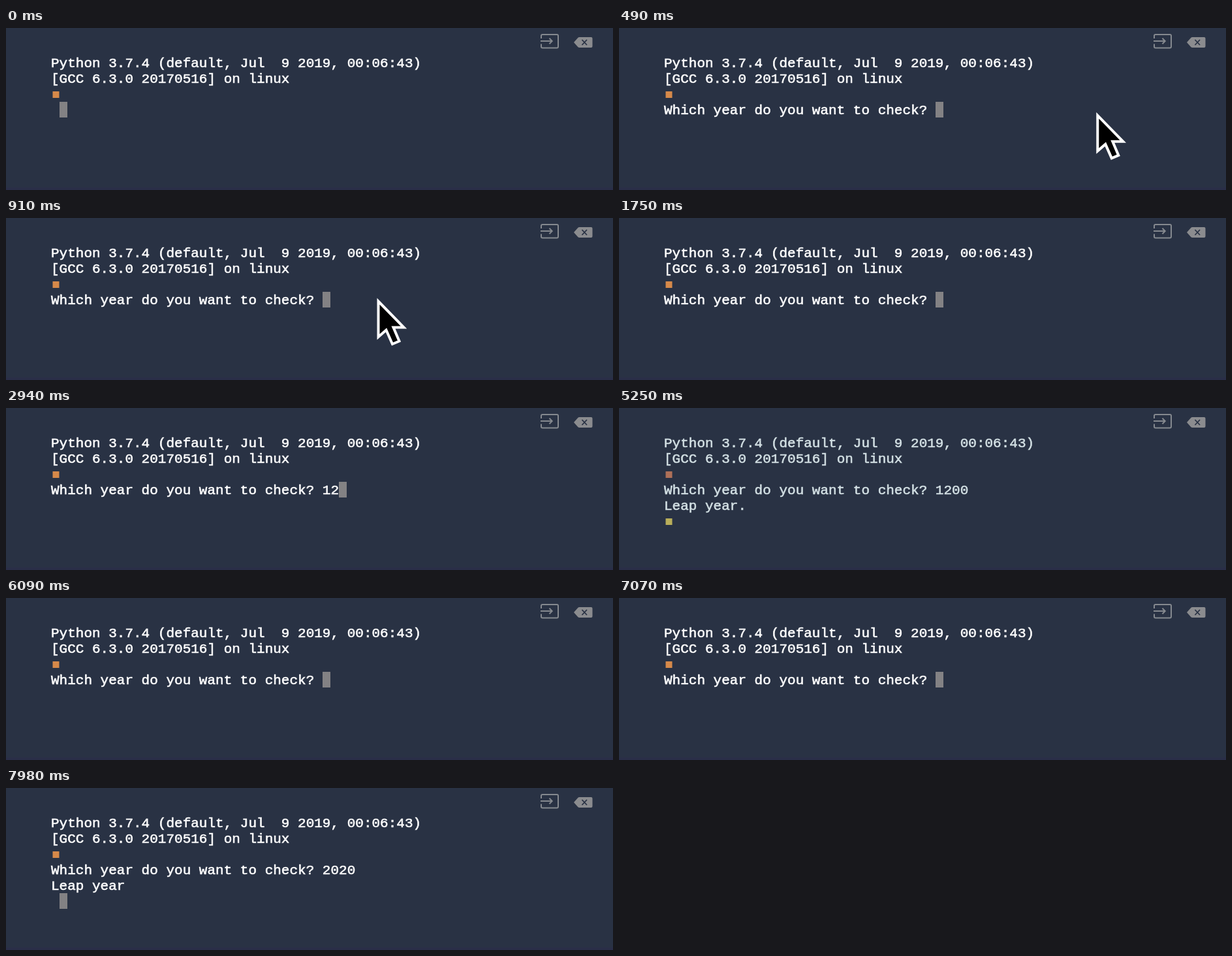
An HTML page for the animation above (8000 ms loop, 930x248 px).

```html
<!DOCTYPE html>
<html lang="en">
<head>
<meta charset="utf-8">
<title>Leap year console</title>
<style>
  html, body { margin: 0; width: 100%; height: 100%; overflow: hidden; background: #293244; }
  svg { display: block; width: 930px; height: 248px; }
  text { font: 21px "Liberation Mono", "DejaVu Sans Mono", monospace; white-space: pre; }
</style>
</head>
<body>
<svg viewBox="0 0 930 248">
  <rect width="930" height="248" fill="#293244"/>
  <rect y="244" width="930" height="4" fill="#2a2e48"/>
  <g fill="none" stroke="#85898f" stroke-width="2">
    <path d="M820 16V12Q820 10 822 10H844Q846 10 846 12V28.5Q846 30.5 844 30.5H822Q820 30.5 820 28.5V24.5"/>
    <path d="M819 20H836.5M832.5 15.8L836.7 20L832.5 24.2"/>
  </g>
  <path d="M870 22L876.2 15Q877 14 878.5 14H896.5Q898.5 14 898.5 16V28Q898.5 30 896.5 30H878.5Q877 30 876.2 29Z" fill="#8b8c8f"/>
  <path d="M882.5 18L890 26M890 18L882.5 26" stroke="#293244" stroke-width="1.8"/>
  <g id="lines" stroke-width="0.6"></g>
  <rect id="promptTop" x="71.5" y="97" width="10" height="10"/>
  <rect id="promptEnd" x="71.5" y="169" width="10" height="10"/>
  <rect id="caret" width="12" height="24" fill="#838284"/>
  <path id="pointer" d="M2.5 5.5V60L14.5 49.5L24 71L34.5 66.5L25.5 45.5H41.5Z"
        fill="#000" stroke="#fff" stroke-width="4"/>
</svg>
<script>
const LOOP = 8000, STEP = 70;
const LEFT = 69, TOP = 41, COL = 12.6, ROW = 24;
const HEADER = ["Python 3.7.4 (default, Jul  9 2019, 00:06:43)", "[GCC 6.3.0 20170516] on linux", ""];
const QUESTION = "Which year do you want to check? ";

const RUNS = [
  { start: 0, ask: 210, year: "1200", keys: [2660, 2870, 3080, 3290], enter: 3430,
    print: 3500, answer: "Leap year.", prompt: 3570 },
  { start: 5740, ask: 6090, year: "2020", keys: [7140, 7280, 7420, 7560], enter: 7770,
    print: 7910, answer: "Leap year", prompt: Infinity }
];

// Pointer tip: time, x, y
const TRACK = [
  [70, 845, -90], [210, 841, 0], [420, 766, 104], [630, 655, 156], [910, 568, 122],
  [1190, 592, 141], [1400, 705, 108], [1610, 814, 27], [1680, 840, -80]
];

const byId = id => document.getElementById(id);
const lineNodes = Array.from({ length: 5 }, (_, row) => {
  const node = document.createElementNS("http://www.w3.org/2000/svg", "text");
  node.setAttribute("x", LEFT);
  node.setAttribute("y", TOP + row * ROW + 19);
  byId("lines").append(node);
  return node;
});

const clamp = v => Math.max(0, Math.min(1, v));
const show = (node, on) => node.setAttribute("visibility", on ? "visible" : "hidden");
const mix = (a, b, k) => `rgb(${a.map((v, i) => Math.round(v + (b[i] - v) * k))})`;

function spline(a, b, c, d, k) {
  return b + k / 2 * (c - a + k * (2 * a - 5 * b + 4 * c - d + k * (3 * (b - c) + d - a)));
}

function drawPointer(t) {
  const last = TRACK.length - 1;
  const active = t >= TRACK[0][0] && t < TRACK[last][0];
  show(byId("pointer"), active);
  if (!active) return;
  const i = TRACK.findIndex(p => p[0] > t) - 1;
  const k = (t - TRACK[i][0]) / (TRACK[i + 1][0] - TRACK[i][0]);
  const at = n => TRACK[Math.max(0, Math.min(last, n))];
  const [x, y] = [1, 2].map(axis =>
    spline(at(i - 1)[axis], at(i)[axis], at(i + 1)[axis], at(i + 2)[axis], k));
  byId("pointer").setAttribute("transform", `translate(${x} ${y})`);
}

function consoleState(t) {
  const run = t < RUNS[1].start ? RUNS[0] : RUNS[1];
  const typed = run.year.slice(0, run.keys.filter(k => k <= t).length);
  const question = t >= run.ask ? QUESTION + typed : "";
  const answer = t >= run.print ? run.answer : "";
  const prompted = t >= run.prompt;
  let caret = [1, 3];
  if (prompted) caret = [2, 5];
  else if (answer) caret = [1, 5];
  else if (t >= run.enter) caret = [0, 4];
  else if (question) caret = [question.length, 3];
  return { lines: [...HEADER, question, answer], caret, prompted };
}

function render(time) {
  const t = Math.floor(time % LOOP / STEP) * STEP;
  const { lines, caret, prompted } = consoleState(t);
  const dim = t < RUNS[1].start ? clamp((t - 3780) / 420) : 0;

  lineNodes.forEach((node, i) => {
    if (node.textContent !== lines[i]) node.textContent = lines[i];
  });
  const ink = mix([255, 255, 255], [211, 224, 228], dim);
  byId("lines").setAttribute("fill", ink);
  byId("lines").setAttribute("stroke", ink);
  byId("promptTop").setAttribute("fill", mix([214, 137, 74], [174, 112, 88], dim));
  byId("promptEnd").setAttribute("fill", mix([229, 200, 75], [185, 174, 90], dim));
  show(byId("promptEnd"), prompted);

  const box = byId("caret");
  box.setAttribute("x", Math.round(LEFT + caret[0] * COL));
  box.setAttribute("y", TOP + caret[1] * ROW);
  box.setAttribute("opacity", 1 - dim);
  drawPointer(t);
}

const origin = performance.now();
function tick() {
  render(performance.now() - origin);
  requestAnimationFrame(tick);
}
tick();
</script>
</body>
</html>
```
